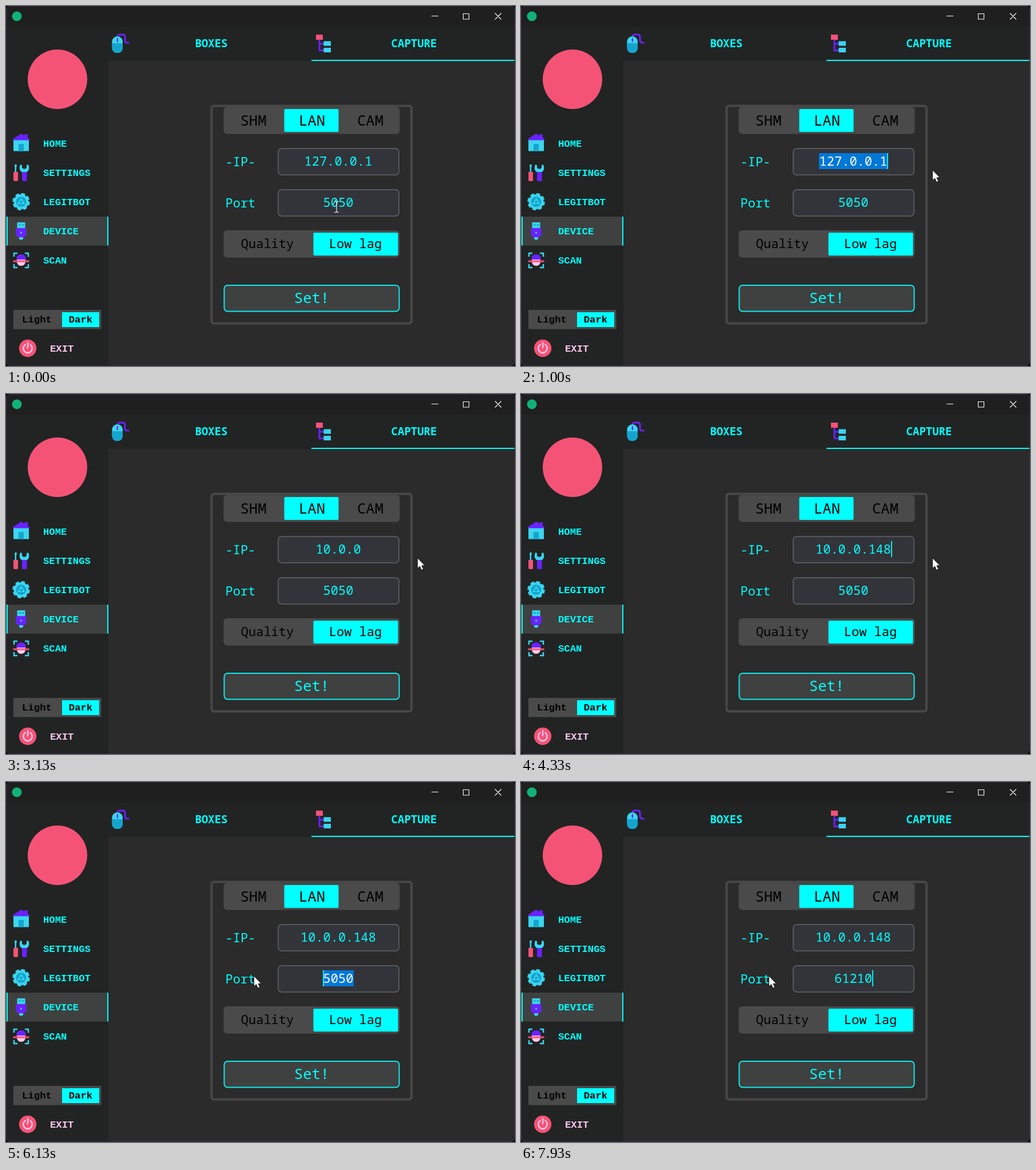
An HTML page that plays this animation: 890 px wide and 629 px high, repeating every 8 s.

```html
<!DOCTYPE html>
<html lang="en">
<head>
<meta charset="utf-8">
<title>Capture settings</title>
<style>
  html, body { margin: 0; width: 100%; height: 100%; overflow: hidden; background: #0b0a0f; }
  svg { display: block; width: 890px; height: 629px; }
  text { font: 22px "Noto Sans Mono", "DejaVu Sans Mono", monospace; fill: #0ff; white-space: pre; }
  .mid { text-anchor: middle; }
  .big { font-size: 25.6px; }
  .menu { font: 700 17.3px "Liberation Mono", monospace; }
  .tab { font-size: 19px; font-weight: 700; }
  .dark { fill: #000; }
  .seg { fill: #4a4a4a; }
  .on { fill: #0ff; }
  .field { fill: #33343a; stroke: #56575b; stroke-width: 2; }
  .sel { fill: #0078d7; }
  .picked { fill: #fff; }
  .c { fill: #3bd5ee; } .b { fill: #14a5cf; } .p { fill: #6a22ff; } .r { fill: #f55376; }
  .line { fill: none; stroke: #fff; stroke-width: 1.1; }
</style>
</head>
<body>
<svg viewBox="0 0 890 629">
  <defs>
    <clipPath id="frame"><rect width="890" height="629" rx="8"/></clipPath>
  </defs>
  <g clip-path="url(#frame)">
    <rect width="890" height="629" fill="#2b2b2b"/>
    <rect width="890" height="96" fill="#222424"/>
    <rect width="179" height="629" fill="#222424"/>
    <rect width="890" height="36" fill="#1f1f1f"/>
    <rect x=".5" y=".5" width="889" height="628" rx="8" fill="none" stroke="#352c42"/>
  </g>

  <!-- title bar -->
  <circle cx="19" cy="18" r="8.5" fill="#10b277"/>
  <path class="line" d="M744 17.500h12M799.500 13.500h10v9.500h-10zM855 12.500l11 11m0-11l-11 11"/>

  <!-- side menu -->
  <circle class="r" cx="90" cy="128" r="52"/>
  <rect y="368" width="179" height="50.500" fill="#3f4140"/>
  <path class="on" d="M1 368h2v50.500h-2zM177 368h2v50.500h-2z"/>
  <g class="menu-icons">
    <path class="c" d="M13 234h27v19.500h-27z"/>
    <path class="b" d="M22 241h9v12.500h-9z"/>
    <path class="p" d="M12 234.500v-2l14.500-9.500 6 3.500v-2.500h5.500v6l3 2.500v2z"/>

    <path class="c" d="M15 277h4l-1 6v7h-2.500v-7z"/>
    <path class="r" d="M13 290h8v14q0 2-2 2h-4q-2 0-2-2z"/>
    <path class="c" d="M25 277q-4 10 4 14h6q8-4 4-14l-3 1v5l-4 2-4-2v-5z"/>
    <path class="p" d="M28 290h8.500v14q0 2-2 2h-4.500q-2 0-2-2z"/>

    <circle cx="26.500" cy="342" r="13.300" fill="none" stroke="#3bd5ee" stroke-width="4" stroke-dasharray="6.300 4.146"/>
    <circle class="c" cx="26.500" cy="342" r="13"/>
    <circle class="b" cx="26.500" cy="342" r="9"/>
    <path class="c" d="M26.500 335l6.500 11h-13z"/>
    <circle class="b" cx="26.500" cy="342.500" r="2.500"/>

    <path class="c" d="M19.500 378h14v11h-14zM23 402h7v5q-3.500 3-7 0z"/>
    <path class="b" d="M22.500 381h3v3h-3zM28 381h3v3h-3z"/>
    <path class="p" d="M17.500 388h18v10q0 4-4 6h-10q-4-2-4-6z"/>
    <circle cx="26.500" cy="396" r="1.700" fill="#3bd5ee"/>

    <path d="M14 438v-6h6M33 432h6v6M39 451v6h-6M20 457h-6v-6" fill="none" stroke="#3bd5ee" stroke-width="2.500"/>
    <path fill="#fbc8ee" d="M19 441h15v6q-1 7-7.500 7t-7.500-7z"/>
    <path class="p" d="M18 443q0-9 8.500-9t8.500 9z"/>
    <path class="r" d="M12.500 444.500h28v3h-28z"/>
  </g>
  <g class="menu-labels">
    <text class="menu" x="65" y="245.500">HOME</text>
    <text class="menu" x="65" y="296.500">SETTINGS</text>
    <text class="menu" x="65" y="347.500">LEGITBOT</text>
    <text class="menu" x="65" y="399">DEVICE</text>
    <text class="menu" x="65" y="450">SCAN</text>
  </g>
  <rect class="seg" x="13" y="531" width="153.500" height="33.500" rx="1"/>
  <rect class="on" x="98" y="535" width="65" height="26"/>
  <text class="menu mid dark" x="54" y="553">Light</text>
  <text class="menu mid dark" x="130.500" y="553">Dark</text>
  <circle class="r" cx="38" cy="598" r="15.200"/>
  <path d="M33.500 591.800a7.800 7.800 0 1 0 9 0M38 588v9" fill="none" stroke="#fbc8ee" stroke-width="2.400" stroke-linecap="round"/>
  <text class="menu" x="77" y="603.500" style="fill:#fbc8ee">EXIT</text>

  <!-- tabs -->
  <path d="M195 53q0-3 4-3h6q3 0 3 4v6q0 4 4 4h3.500" fill="none" stroke="#6a22ff" stroke-width="3"/>
  <rect class="c" x="185.500" y="53" width="18.500" height="29" rx="9"/>
  <path class="b" d="M185.500 65h18.500v8q0 9-9.250 9t-9.250-9z"/>
  <path class="p" d="M193.800 56h2.200v7h-2.200z"/>
  <path d="M548 58v19.500h8M548 66h8" fill="none" stroke="#6a22ff" stroke-width="3"/>
  <path class="r" d="M542 50h12v9h-12z"/>
  <path class="c" d="M555.500 61.500h12.500v8h-12.500zM555.500 73h12.500v8h-12.500z"/>
  <text class="tab mid" x="359" y="71.500">BOXES</text>
  <text class="tab mid" x="713.500" y="71.500">CAPTURE</text>
  <rect class="on" x="534" y="94" width="355" height="2"/>

  <!-- capture form -->
  <rect x="359.500" y="174.500" width="349.500" height="380" rx="4" fill="none" stroke="#484848" stroke-width="4"/>
  <rect class="seg" x="380.500" y="176.500" width="308" height="47" rx="6"/>
  <rect class="on" x="486.500" y="180" width="95" height="40" rx="2"/>
  <text class="big mid dark" x="432.500" y="209">SHM</text>
  <text class="big mid dark" x="535" y="209">LAN</text>
  <text class="big mid dark" x="637" y="209">CAM</text>
  <text x="383.500" y="280">-IP-</text>
  <text x="383.500" y="352">Port</text>
  <rect class="field" x="476" y="249" width="211" height="46" rx="6"/>
  <rect class="field" x="476" y="321" width="211" height="46" rx="6"/>
  <rect class="seg" x="380.500" y="392" width="308" height="47.500" rx="6"/>
  <rect class="on" x="537.500" y="396" width="148" height="40" rx="2"/>
  <text class="mid dark" x="457" y="423">Quality</text>
  <text class="mid dark" x="611" y="423">Low lag</text>
  <rect x="381.500" y="488" width="306" height="45.500" rx="6" fill="#3f4140" stroke="#0cebee" stroke-width="2"/>
  <text class="big mid" x="534.500" y="519">Set!</text>

  <g id="ip"></g>
  <g id="port"></g>
  <g id="cursor">
    <path id="beam" class="line" d="M-4 -9.500h2.500l1.500 1 1.500-1h2.500M0 -8.500v17M-4 9.500h2.500l1.500-1 1.500 1h2.500"/>
    <path id="arrow" d="M.5 .5v18.200l4-3.700 3 6.500 3.400-1.400-3-6.300h5.500z" fill="#fff" stroke="#000" stroke-width=".8"/>
  </g>
</svg>
<script>
const LOOP = 8000, MID = 581, CHAR = 13.2;
const $ = id => document.getElementById(id);

// time, value, caret index (-1 = hidden), selection start, selection end
const ipSteps = [
  [0, '127.0.0.1', -1],
  [670, '127.0.0.1', 2, 0, 2],
  [730, '127.0.0.1', 7, 0, 7],
  [800, '127.0.0.1', 9, 0, 9],
  [1270, '127.0.0.1', -1, 0, 9],
  [1600, '127.0.0.1', 9, 0, 9],
  [1670, '1', 1],
  [2000, '10', 2],
  [2200, '10', -1],
  [2270, '10.', -1],
  [2470, '10.', 3],
  [2530, '10.0', 4],
  [2800, '10.0.', 5],
  [3000, '10.0.0', 6],
  [3130, '10.0.0', -1],
  [3270, '10.0.0.', -1],
  [3400, '10.0.0.', 7],
  [3600, '10.0.0.1', 8],
  [3930, '10.0.0.14', 9],
  [4000, '10.0.0.14', -1],
  [4070, '10.0.0.148', -1],
  [4330, '10.0.0.148', 10],
  [4800, '10.0.0.148', -1]
];
const portSteps = [
  [0, '5050', -1],
  [5200, '5050', 2, 2, 4],
  [5270, '5050', 0, 0, 4],
  [5800, '5050', -1, 0, 4],
  [6130, '5050', 0, 0, 4],
  [6270, '6', 1],
  [6400, '61', 2],
  [6530, '612', 3],
  [6730, '612', -1],
  [6930, '6121', -1],
  [7000, '6121', 4],
  [7200, '61210', 5],
  [7600, '61210', -1],
  [7930, '61210', 5]
];
// time, x, y, shape
const cursorSteps = [
  [0, 578, 351, 'beam'], [130, 574, 343, 'beam'], [200, 560, 322, 'beam'],
  [270, 543, 298, 'arrow'], [330, 526, 286, 'beam'], [400, 514, 281, 'beam'],
  [470, 508, 279, 'beam'], [670, 546, 279, 'beam'], [730, 612, 280, 'beam'],
  [800, 672, 283, 'beam'], [870, 711, 285, 'arrow'], [1000, 719, 286, 'arrow'],
  [4800, 714, 296, 'arrow'], [4870, 694, 318, 'arrow'], [4930, 668, 338, 'beam'],
  [5000, 655, 342, 'beam'], [5200, 583, 348, 'beam'], [5270, 532, 350.5, 'beam'],
  [5330, 478, 353, 'beam'], [5400, 440, 343, 'arrow'], [5470, 429, 341, 'arrow'],
  [5530, 433, 338.5, 'arrow']
];

const stepAt = (steps, t) => steps.findLast(s => s[0] <= t);

function drawField(id, steps, t, y) {
  const step = stepAt(steps, t), box = $(id);
  if (box.step === step) return;
  box.step = step;
  const [, value, caret, from = 0, to = 0] = step;
  const edge = i => Math.floor(MID + (i - value.length / 2) * CHAR);
  const bar = (x, w, cls) => `<rect class="${cls}" x="${x}" y="${y}" width="${w}" height="28"/>`;
  let svg = to > from ? bar(edge(from), edge(to) - edge(from) + 1, 'sel') : '';
  svg += `<text class="mid" x="${MID}" y="${y + 22}">${value.slice(0, from)}` +
    `<tspan class="picked">${value.slice(from, to)}</tspan>${value.slice(to)}</text>`;
  if (caret >= 0) svg += bar(edge(caret), 1.8, 'on');
  box.innerHTML = svg;
}

function draw() {
  const t = performance.now() % LOOP;
  drawField('ip', ipSteps, t, 257);
  drawField('port', portSteps, t, 329);
  const [, x, y, shape] = stepAt(cursorSteps, t);
  $('cursor').setAttribute('transform', `translate(${x} ${y})`);
  for (const id of ['beam', 'arrow']) $(id).style.display = id === shape ? '' : 'none';
  requestAnimationFrame(draw);
}
draw();
</script>
</body>
</html>
```
